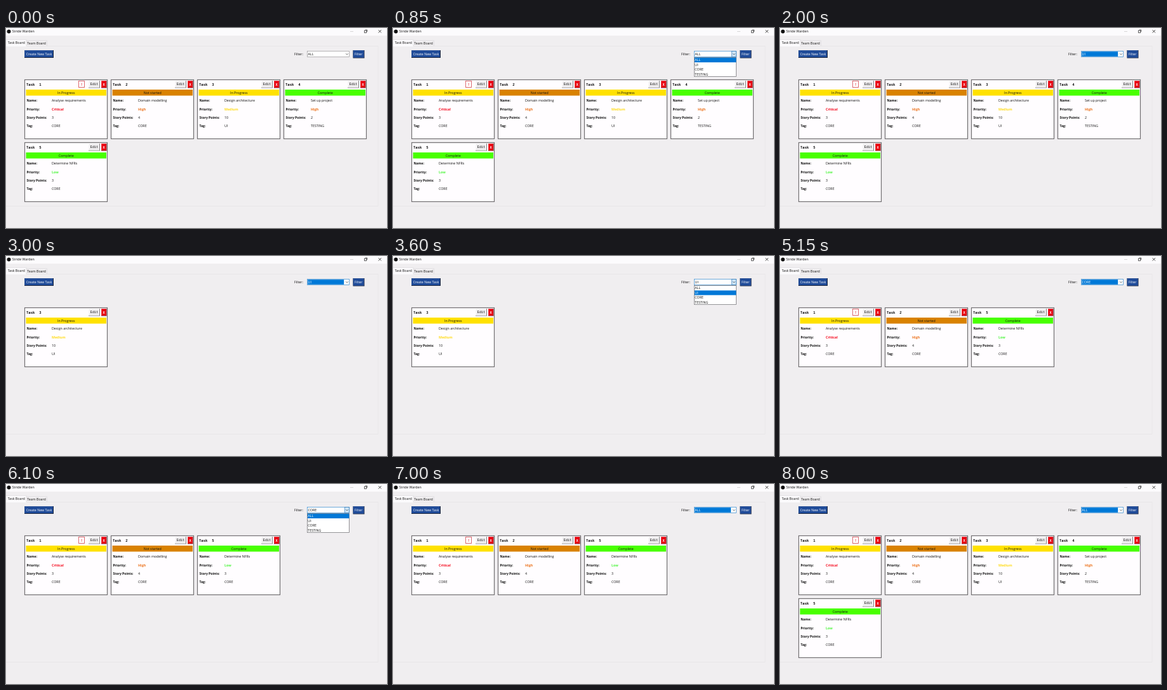
Recreate the animation shown at these times as an HTML page with a canvas. Size 600 by 315 pixels, loop 8050 ms.

```html
<!DOCTYPE html>
<html lang="en">
<head>
<meta charset="utf-8">
<title>Stride Warden</title>
<style>
html, body { margin: 0; width: 100%; height: 100%; overflow: hidden; background: #f0eef0; }
canvas { display: block; width: 600px; height: 315px; }
</style>
</head>
<body>
<canvas id="stage" width="600" height="315"></canvas>
<script>
const ctx = document.getElementById('stage').getContext('2d');
const LOOP = 8050;
const SANS = '"Open Sans", "Noto Sans", sans-serif';
const REGULAR = '5.3px ' + SANS;
const BOLD = 'bold 5.1px ' + SANS;
const HEADING = 'bold 5.6px "DejaVu Sans Mono", monospace';
const MONO = '5.2px "Liberation Mono", monospace';
const MONO_BOLD = 'bold 5.4px "Liberation Mono", monospace';
const BLUE = '#0078d7', NAVY = '#1f4b99';

const STATUS = { 'In Progress': '#ffe100', 'Not started': '#d98200', 'Complete': '#48ff00' };
const PRIORITY = { Critical: '#f50a1e', High: '#ec7420', Medium: '#ffdc1e', Low: '#4cf53c' };
const OPTIONS = ['ALL', 'UI', 'CORE', 'TESTING'];

const task = (id, status, name, priority, points, tag) => ({ id, status, name, priority, points, tag });
const TASKS = [
  task(1, 'In Progress', 'Analyse requirements', 'Critical', 3, 'CORE'),
  task(2, 'Not started', 'Domain modelling', 'High', 4, 'CORE'),
  task(3, 'In Progress', 'Design architecture', 'Medium', 10, 'UI'),
  task(4, 'Complete', 'Set up project', 'High', 2, 'TESTING'),
  task(5, 'Complete', 'Determine NFRs', 'Low', 3, 'CORE')
];

// Each step changes part of the interface state.
const STEPS = [
  [0, { filter: 'ALL', value: 'ALL', open: false, hover: 'ALL', focus: false }],
  [750, { open: true, focus: true }],
  [1300, { hover: 'UI' }],
  [1700, { value: 'UI', open: false }],
  [2350, { filter: 'UI' }],
  [3300, { open: true }],
  [3700, { hover: 'CORE' }],
  [4000, { value: 'CORE', open: false }],
  [4750, { filter: 'CORE' }],
  [5500, { open: true }],
  [5800, { hover: 'UI' }],
  [5950, { hover: 'ALL' }],
  [6600, { value: 'ALL', open: false }],
  [7250, { filter: 'ALL' }]
];

function stateAt(t) {
  const state = {};
  for (const [time, change] of STEPS) if (t >= time) Object.assign(state, change);
  return state;
}

function box(x, y, w, h, fill) {
  ctx.fillStyle = fill;
  ctx.fillRect(x, y, w, h);
}

function frame(x, y, w, h, color, width = 1) {
  ctx.strokeStyle = color;
  ctx.lineWidth = width;
  ctx.strokeRect(x + 0.5, y + 0.5, w - 1, h - 1);
}

function line(points, color, width = 0.7) {
  ctx.strokeStyle = color;
  ctx.lineWidth = width;
  ctx.beginPath();
  points.forEach(([x, y]) => ctx.lineTo(x, y));
  ctx.stroke();
}

function text(str, x, y, font = REGULAR, color = '#111', align = 'left') {
  ctx.font = font;
  ctx.fillStyle = color;
  ctx.textAlign = align;
  ctx.fillText(str, x, y);
}

function button(x, y, w, h, fill, light, dark) {
  box(x, y, w, h, dark);
  box(x, y, w - 1, h - 1, light);
  box(x + 0.6, y + 0.6, w - 1.6, h - 1.6, fill);
}

function drawWindow() {
  box(0, 0, 600, 315, '#f0eef0');
  box(0, 0, 600, 12, '#fcfbfd');
  ctx.fillStyle = '#111';
  ctx.beginPath();
  ctx.arc(4.5, 5.5, 3, 0, Math.PI * 2);
  ctx.fill();
  text('Stride Warden', 9.7, 7.4);

  line([[542, 5.5], [547, 5.5]], '#c8c8c8');
  ctx.strokeStyle = '#222';
  ctx.lineWidth = 0.7;
  ctx.strokeRect(564.3, 4, 3.4, 3.4);
  line([[565.6, 3], [568.8, 3], [568.8, 6.2]], '#222');
  line([[586.5, 3], [591, 7.5]], '#222', 0.8);
  line([[591, 3], [586.5, 7.5]], '#222', 0.8);

  line([[0, 28.5], [586, 28.5], [586, 280.5], [0, 280.5]], '#e5e3e6');
  box(0, 18, 32, 11, '#fbfafc');
  line([[0, 18.3], [32, 18.3], [32, 28.5]], '#dcdadd');
  line([[32, 19.8], [64.5, 19.8], [64.5, 28.5]], '#dcdadd');
  text('Task Board', 2.7, 25.3);
  text('Team Board', 33.2, 26.3);

  button(29, 35, 46, 12, NAVY, '#45649c', '#1c263c');
  text('Create New Task', 52, 42.8, REGULAR, '#fff', 'center');
  text('Filter:', 454, 43);
  button(546.5, 35, 18, 12.5, NAVY, '#45649c', '#1c263c');
  text('Filter', 555.2, 43, REGULAR, '#fff', 'center');
}

function drawCombo(s) {
  const selected = s.focus && !s.open;
  box(474, 36, 67, 10, '#fff');
  if (s.open) box(533, 36, 8, 10, '#cce4f7');
  frame(474, 36, 67, 10, s.focus ? '#4b96d2' : '#a3a1a4', 0.8);
  if (s.open) frame(533, 36, 8, 10, '#3f83bd', 0.7);
  if (selected) box(475.2, 37.2, 57, 7.6, BLUE);
  text(s.value, 475.6, 43, REGULAR, selected ? '#fff' : '#111');
  line([[535.2, 40.2], [537, 42], [538.8, 40.2]], '#444', 0.7);
}

function drawList(s) {
  box(474, 46, 67, 31.5, '#fff');
  frame(474, 46, 67, 31, '#77757a', 0.8);
  OPTIONS.forEach((name, i) => {
    const y = 46.8 + i * 7.5, on = name === s.hover;
    if (on) box(474.8, y, 65.6, 7.3, BLUE);
    text(name, 475.3, y + 5.6, REGULAR, on ? '#fff' : '#111');
  });
}

function drawCard(card, slot) {
  ctx.save();
  ctx.translate(29 + slot % 4 * 136, 81 + Math.floor(slot / 4) * 99);
  box(0, 0, 131, 94, '#fffdff');
  frame(0, 0, 131, 94, '#727072', 1.2);
  text('Task  ' + card.id, 3, 9.8, HEADING);

  if (card.priority === 'Critical') {
    box(85, 2, 10, 11, '#fff');
    frame(85, 2, 10, 11, '#d85a62', 0.9);
    text('!', 90, 9.5, MONO_BOLD, '#e00010', 'center');
  }
  button(101, 2, 18, 11.5, '#efedef', '#fff', '#858386');
  text('Edit', 110, 9.4, MONO, '#111', 'center');
  button(121, 2, 8.5, 11.5, '#e9000f', '#f0525a', '#7e0a10');
  text('X', 125, 9.5, MONO_BOLD, '#fff', 'center');

  box(2.5, 16, 126.5, 9.5, STATUS[card.status]);
  text(card.status, 65.7, 22.5, REGULAR, '#111', 'center');

  const rows = [['Name:', card.name], ['Priority:', card.priority],
    ['Story Points:', card.points], ['Tag:', card.tag]];
  rows.forEach(([label, value], i) => {
    const y = 35.4 + i * 13.15, strong = i === 1;
    text(label, 3.4, y, BOLD);
    text(value, 43, y, strong ? 'bold 5.3px ' + SANS : REGULAR, strong ? PRIORITY[value] : '#111');
  });
  ctx.restore();
}

function draw(t) {
  const s = stateAt(t);
  drawWindow();
  TASKS.filter(c => s.filter === 'ALL' || c.tag === s.filter).forEach(drawCard);
  drawCombo(s);
  if (s.open) drawList(s);
}

const start = performance.now();
function tick() {
  draw((performance.now() - start) % LOOP);
  requestAnimationFrame(tick);
}
tick();
</script>
</body>
</html>
```
